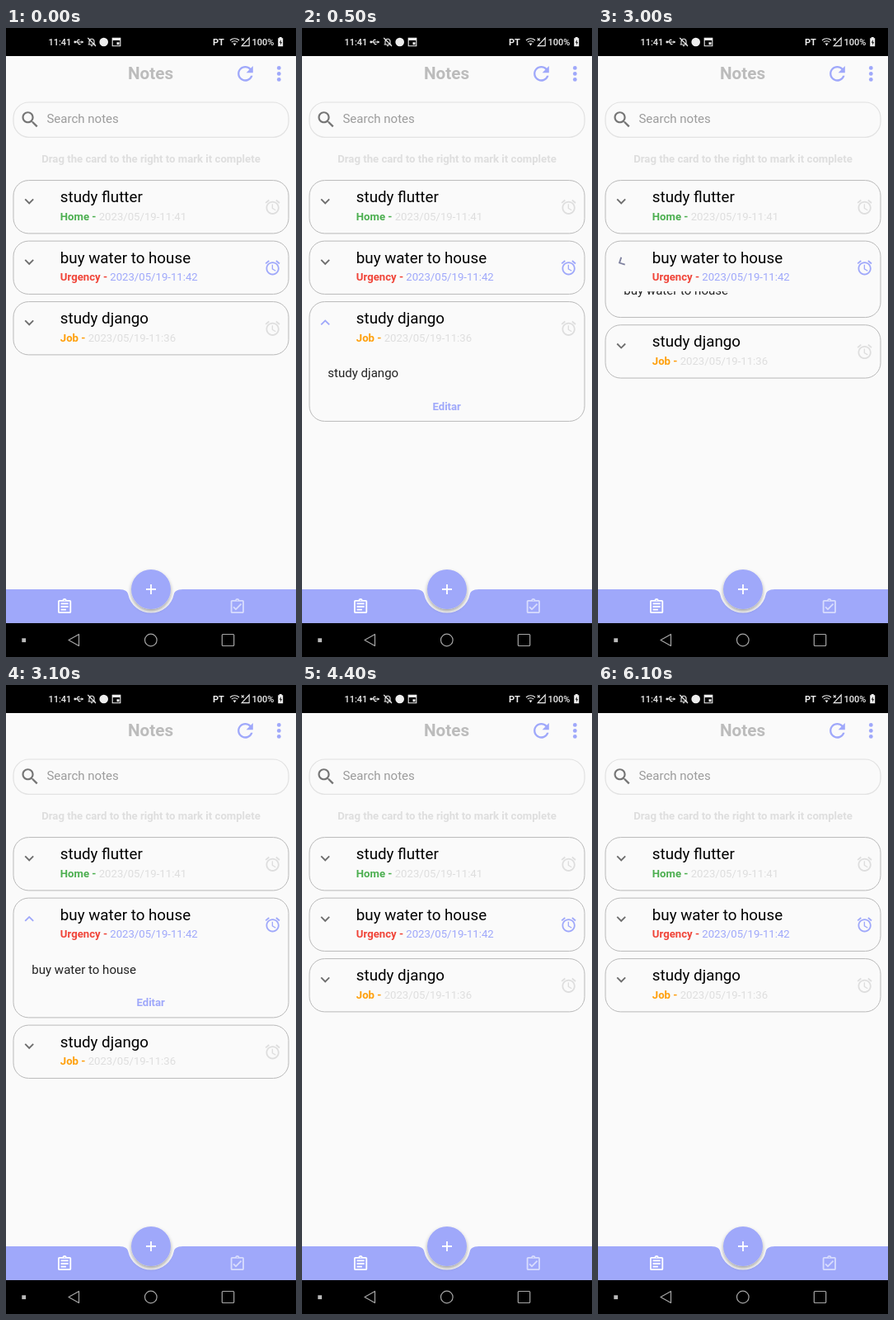
An HTML page for the animation above (8000 ms loop, 352 by 762 pixels).

```html
<!DOCTYPE html>
<html lang="en">
<head>
<meta charset="utf-8">
<title>Notes</title>
<style>
html, body { margin: 0; width: 100%; height: 100%; overflow: hidden; background: #fafafa; }
svg { display: block; width: 352px; height: 762px; font-family: Roboto, sans-serif; }
.bold { font-weight: 700; }
.small { font-size: 13.16px; }
.body { font-size: 15.04px; }
.accent { fill: #9fa8fa; }
.pale { fill: #dedede; }
.status { font-size: 11px; font-weight: 500; fill: #eee; }
</style>
</head>
<body>
<svg viewBox="0 0 352 762">
  <defs>
    <path id="chevron" d="M16.59 8.59 12 13.17 7.41 8.59 6 10l6 6 6-6z"/>
    <path id="search" d="M15.5 14h-.79l-.28-.27C15.41 12.59 16 11.11 16 9.5 16 5.91 13.09 3 9.5 3S3 5.91 3 9.5 5.91 16 9.5 16c1.61 0 3.09-.59 4.23-1.57l.27.28v.79l5 4.99L20.49 19l-4.99-5zm-6 0C7.01 14 5 11.99 5 9.5S7.01 5 9.5 5 14 7.01 14 9.5 11.99 14 9.5 14z"/>
    <path id="refresh" d="M17.65 6.35C16.2 4.9 14.21 4 12 4c-4.42 0-7.99 3.58-7.99 8s3.57 8 7.99 8c3.73 0 6.84-2.55 7.73-6h-2.08c-.82 2.33-3.04 4-5.65 4-3.31 0-6-2.69-6-6s2.69-6 6-6c1.66 0 3.14.69 4.22 1.78L13 11h7V4l-2.35 2.35z"/>
    <path id="alarm" d="M22 5.72l-4.6-3.86-1.29 1.53 4.6 3.86L22 5.72zM7.88 3.39L6.6 1.86 2 5.71l1.29 1.53 4.59-3.85zM12.5 8H11v6l4.75 2.85.75-1.23-4-2.37V8zM12 4c-4.97 0-9 4.03-9 9s4.02 9 9 9c4.97 0 9-4.03 9-9s-4.03-9-9-9zm0 16c-3.87 0-7-3.13-7-7s3.13-7 7-7 7 3.13 7 7-3.13 7-7 7z"/>
    <path id="board" d="M19 3h-4.18C14.4 1.84 13.3 1 12 1s-2.4.84-2.82 2H5c-1.1 0-2 .9-2 2v14c0 1.1.9 2 2 2h14c1.1 0 2-.9 2-2V5c0-1.1-.9-2-2-2zm-7-.25c.41 0 .75.34.75.75s-.34.75-.75.75-.75-.34-.75-.75.34-.75.75-.75zM19 19H5V5h14v14z"/>
    <filter id="shadow" x="-30%" y="-30%" width="160%" height="170%">
      <feDropShadow dx="0" dy="2.5" stdDeviation="2" flood-color="#000" flood-opacity=".35"/>
    </filter>
    <clipPath id="fold"><rect x="9" y="61" width="334" height="0"/></clipPath>
  </defs>

  <rect width="352" height="762" fill="#fafafa"/>

  <g id="top">
    <text class="bold" x="175.5" y="62.3" font-size="20.7" text-anchor="middle" fill="#bcbcbc">Notes</text>
    <use href="#refresh" class="accent" transform="translate(276.4 41.3) scale(1.17)"/>
    <g class="accent"><circle cx="331.3" cy="48.4" r="2.4"/><circle cx="331.3" cy="55.4" r="2.4"/><circle cx="331.3" cy="62.4" r="2.4"/></g>
    <rect x="9" y="90" width="334" height="42.3" rx="19" fill="none" stroke="#e2e2e2" stroke-width="1.2"/>
    <use href="#search" fill="#757575" transform="translate(16.2 97.9) scale(1.09)"/>
    <text class="body" x="49.4" y="115.2" fill="#9c9c9c">Search notes</text>
    <text class="bold small pale" x="176" y="163" text-anchor="middle">Drag the card to the right to mark it complete</text>
  </g>

  <g id="cards"></g>

  <g id="bottom">
    <path class="accent" d="M0 680H134C143 680 147 681 148.2 686A28.4 28.4 0 0 0 203.8 686C205 681 209 680 218 680H352V722H0Z"/>
    <circle class="accent" cx="176" cy="680" r="24" filter="url(#shadow)"/>
    <path d="M170 680h12M176 674v12" stroke="#fff" stroke-width="1.8"/>
    <g fill="#fff" transform="translate(60.3 690.2) scale(.9)">
      <use href="#board"/><path d="M7 7h10v2H7zM7 11h10v2H7zM7 15h7v2H7z"/>
    </g>
    <g fill="#d8dcfd" transform="translate(270 690.2) scale(.9)">
      <use href="#board"/><path d="M18 9l-1.41-1.42L10 14.17l-2.59-2.58L6 13l4 4z"/>
    </g>
    <rect y="721" width="352" height="41"/>
    <rect x="19.3" y="739.3" width="4.8" height="4.8" fill="#bbb"/>
    <g fill="none" stroke="#a6a6a6" stroke-width="1.2" stroke-linejoin="round">
      <path d="M88.5 734.5v14L76 741.5z"/>
      <circle cx="175.8" cy="741.5" r="7.3"/>
      <rect x="262.3" y="734.5" width="14.4" height="14" rx="1"/>
    </g>
  </g>

  <g id="status">
    <rect width="352" height="34"/>
    <g class="status">
      <text x="51.4" y="21">11:41</text>
      <text x="251" y="21" font-weight="700">PT</text>
      <text x="298.6" y="21">100%</text>
    </g>
    <g fill="none" stroke="#eee" stroke-width="1.1">
      <path d="M83 17h9.5M85.5 17l2-2.6h2M86.5 17l2 2.6h2"/>
      <path d="M101 19.5v-3.2c0-4 6-4 6 0v3.2M99.6 20h8.8M99.2 12l9.8 10"/>
      <path d="M129.2 12.2h9.6v9.6h-9.6z"/>
      <path d="M272 15c3-3 8-3 11 0M273.8 17.2c2-2 5.400-2 7.400 0"/>
      <path d="M295.2 12v9.600h-9z"/>
      <path d="M285.800 12.400l3 3m0-3l-3 3"/>
    </g>
    <g fill="#eee">
      <path d="M91.500 15.300l3 1.700-3 1.700zM129 12h10v3h-10zM134.500 17.200h3v3h-3zM275.500 18.500h4l-2 3zM102.500 21h3l-1.500 1.500z"/>
      <circle cx="83.800" cy="17" r="1.400"/>
      <circle cx="118.700" cy="17" r="5.300"/>
      <path d="M331.700 11h3v1.300h1.500v10h-6v-10h1.500z"/>
    </g>
    <path d="M333.800 14l-2 3.800h1.300v3l2-3.900h-1.300z" fill="#222"/>
  </g>
</svg>
<script>
const LOOP = 8000;
const OPEN = 80.5;
const notes = [
  { title: 'study flutter', tag: 'Home', color: '#4caf50', date: '2023/05/19-11:41' },
  { title: 'buy water to house', tag: 'Urgency', color: '#f04438', date: '2023/05/19-11:42', due: true },
  { title: 'study django', tag: 'Job', color: '#ff9f0a', date: '2023/05/19-11:36' }
];
// [start ms, card index, open fraction]
const steps = [
  [0, 2, 0], [400, 2, .35], [500, 2, 1], [2100, 2, .41], [2200, 2, 0],
  [3000, 1, .35], [3100, 1, 1], [4300, 1, .315], [4400, 1, 0]
];

const list = document.getElementById('cards');
list.innerHTML = notes.map(n => {
  const shade = n.due ? 'accent' : 'pale';
  return `<g>
    <rect class="box" x="9" y="0" width="334" height="64.300" rx="18.500" fill="none" stroke="#b9b9b9"/>
    <g class="fold"><text class="body" x="31.300" y="91.500" fill="#222">${n.title}</text>
      <text class="bold small accent" x="175.700" y="131" text-anchor="middle">Editar</text></g>
    <use class="arrow" href="#chevron"/>
    <text x="65.800" y="26.600" font-size="18.800">${n.title}</text>
    <text class="small" x="65.800" y="48"><tspan class="bold" fill="${n.color}">${n.tag} - </tspan><tspan class="${shade}">${n.date}</tspan></text>
    <use href="#alarm" class="${shade}" transform="translate(312.800 21.500) scale(.9)"/>
  </g>`;
}).join('');

const cards = [...list.children].map(el => ({
  el,
  box: el.querySelector('.box'),
  fold: el.querySelector('.fold'),
  arrow: el.querySelector('.arrow')
}));
const clip = document.querySelector('#fold rect');
const mix = (a, b, k) => Math.round(a + (b - a) * k);

// The body stays centred in its clipped area while the card grows.
function pose(card, y, k) {
  const shift = (k - 1) * OPEN / 2;
  card.el.setAttribute('transform', `translate(0 ${y})`);
  card.box.setAttribute('height', 64.3 + k * OPEN);
  card.fold.style.display = k ? '' : 'none';
  if (k) {
    card.fold.setAttribute('clip-path', 'url(#fold)');
    clip.setAttribute('height', k * OPEN);
    for (const [i, base] of [91.5, 131].entries())
      card.fold.children[i].setAttribute('y', base + shift);
  }
  card.arrow.setAttribute('transform',
    `translate(28.200 25.300) rotate(${180 * k}) scale(.94) translate(-12 -12)`);
  card.arrow.setAttribute('fill',
    `rgb(${mix(110, 159, k)},${mix(110, 168, k)},${mix(110, 250, k)})`);
}

function draw(t) {
  const [, active, k] = steps.findLast(s => s[0] <= t);
  let y = 184.6;
  cards.forEach((card, i) => {
    const open = i === active ? k : 0;
    pose(card, y, open);
    y += 73.5 + open * OPEN;
  });
}

const start = performance.now();
function tick() {
  draw((performance.now() - start) % LOOP);
  requestAnimationFrame(tick);
}
tick();
</script>
</body>
</html>
```
